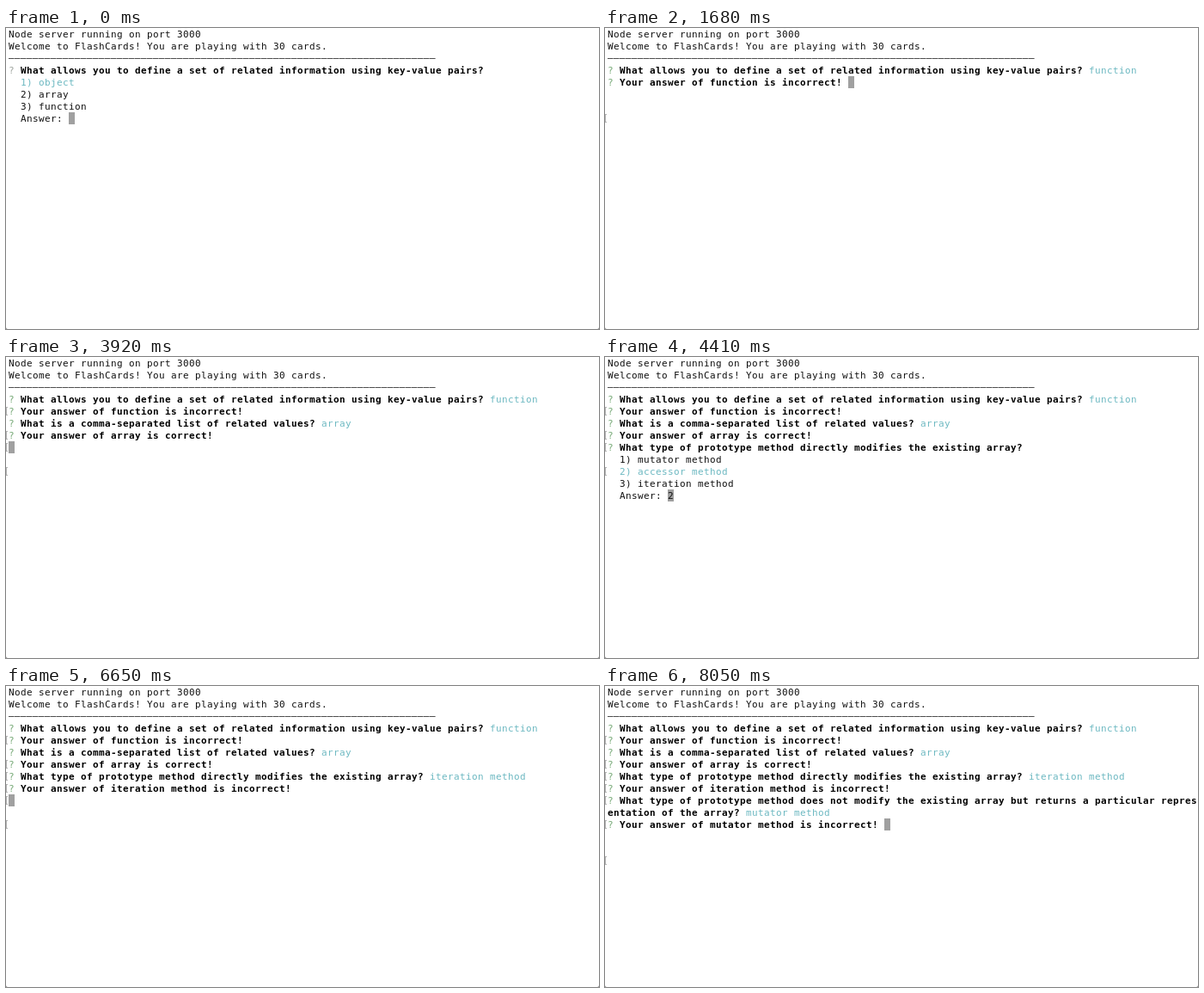
These frames come from a looping animation (690 by 350 pixels, 8.12 s). An HTML page:

```html
<!DOCTYPE html>
<html lang="en">
<head>
<meta charset="utf-8">
<title>Flash card quiz</title>
<style>
  html, body { margin: 0; width: 690px; height: 350px; overflow: hidden; background: #777; }
  #stage { position: relative; width: 690px; height: 350px; background: #fff; border-radius: 0 0 2px 2px; overflow: hidden; }
  pre { margin: 0; padding: 1px 0 0 3px; color: #111; font: 11px/14px "DejaVu Sans Mono", "Noto Sans Mono", monospace; letter-spacing: calc(7px - 1ch); }
  b { color: #000; font-weight: 700; }
  .rule { position: relative; top: -1px; }
  .pick { color: #6cb8c1; }
  .ask { color: #78aa78; }
  .dim { color: #a0a6a0; }
  .cursor { display: inline-block; width: 7px; height: 14px; margin-top: -1px; line-height: 16px; vertical-align: top; background: #a0a0a0; }
  .mark { position: absolute; left: 0; width: 1px; height: 8px; border: 1px solid #b0b0b0; border-right: 0; }
</style>
</head>
<body>
<div id="stage"><pre id="text"></pre><div id="marks"></div></div>
<script>
const LOOP = 8120, ROW = 14;
const methods = ["mutator method", "accessor method", "iteration method"];

// show: question appears, keys: [time, digit] (0 = erased), enter: answer given, next: feedback dismissed
const cards = [
  { q: "What allows you to define a set of related information using key-value pairs?",
    list: ["object", "array", "function"], show: 0, keys: [[350, 3]], enter: 1050, next: 2100 },
  { q: "What is a comma-separated list of related values?", right: true,
    list: ["array", "object", "function"], show: 2170, keys: [], enter: 3010, next: 3920 },
  { q: "What type of prototype method directly modifies the existing array?",
    list: methods, show: 3990, keys: [[4200, 2], [4760, 0], [5250, 3]], enter: 5460, next: 6650 },
  { q: "What type of prototype method does not modify the existing array but returns a particular repres\nentation of the array?",
    list: methods, show: 6720, keys: [], enter: 7910, next: LOOP }
];

const span = (cls, text) => `<span class="${cls}">${text}</span>`;
const cursor = (text = "") => span("cursor", text);

function render(t) {
  const lines = [
    "Node server running on port 3000",
    "Welcome to FlashCards! You are playing with 30 cards.",
    span("rule", "–".repeat(71))
  ];
  const marks = [];

  for (const card of cards) {
    if (t < card.show) {
      lines.push(cursor());
      break;
    }
    const digit = card.keys.reduce((d, [at, key]) => t >= at ? key : d, 0);
    const chosen = Math.max(digit, 1) - 1;
    const answered = t >= card.enter;
    const sign = span(card.show || answered ? "ask" : "dim", "?");
    const [first, rest] = card.q.split("\n");
    const tail = answered ? " " + span("pick", card.list[chosen]) : "";

    lines.push(`${sign} <b>${first}</b>` + (rest ? "" : tail));
    if (rest) lines.push(`<b>${rest}</b>` + tail);

    if (!answered) {
      card.list.forEach((name, i) => {
        const option = `${i + 1}) ${name}`;
        lines.push("  " + (i === chosen ? span("pick", option) : option));
      });
      lines.push("  Answer: " + cursor(digit || ""));
      break;
    }

    marks.push(lines.length + card.list.length);
    const verdict = card.right ? "correct" : "incorrect";
    const feedback = `${sign} <b>Your answer of ${card.list[chosen]} is ${verdict}!</b> `;
    const done = t >= card.next;
    if (done) marks.push(lines.length);
    lines.push(feedback + (done ? "" : cursor()));
    if (!done) break;
  }

  return {
    text: lines.join("\n"),
    marks: marks.map(row => `<i class="mark" style="top:${row * ROW + 2}px"></i>`).join("")
  };
}

const textBox = document.getElementById("text");
const markBox = document.getElementById("marks");
const start = performance.now();
let last = "";

function tick() {
  const view = render((performance.now() - start) % LOOP);
  if (view.text !== last) {
    textBox.innerHTML = last = view.text;
    markBox.innerHTML = view.marks;
  }
  requestAnimationFrame(tick);
}
tick();
</script>
</body>
</html>
```
